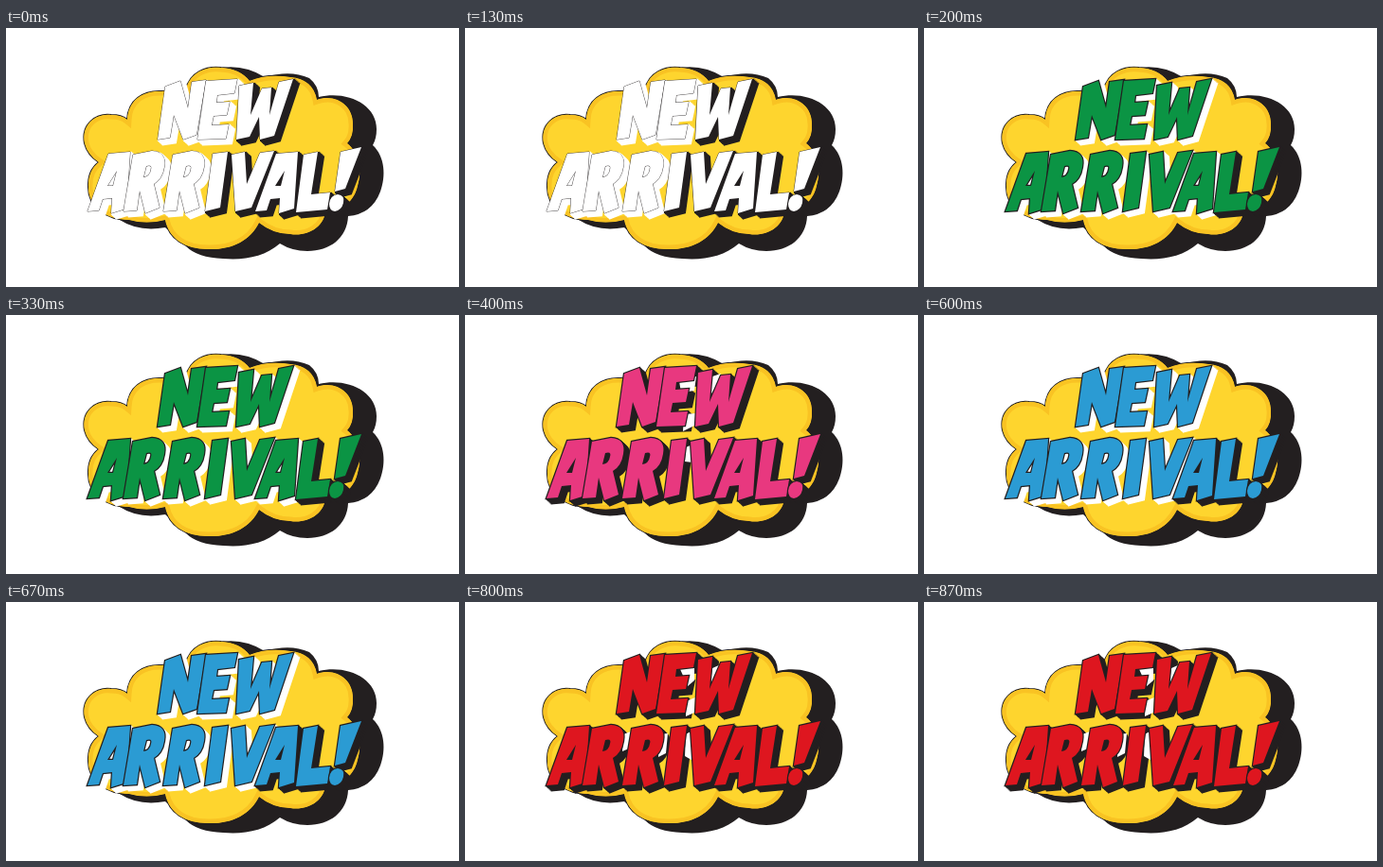
An HTML page with a canvas for the animation above (0.99 s loop, 478 by 274 pixels).

```html
<!DOCTYPE html>
<html lang="en">
<head>
<meta charset="utf-8">
<title>New arrival!</title>
<style>
html, body { margin: 0; overflow: hidden; background: #fff; }
canvas { display: block; }
</style>
</head>
<body>
<canvas id="stage" width="478" height="274" aria-label="New arrival!"></canvas>
<script>
const ctx = document.getElementById('stage').getContext('2d');
const DARK = '#231f20', LOOP = 990, STEP = 200;

const cloud = new Path2D(`M83 122C79 101 96 90 111 92Q122 92 128 97C129 76 145 66 164 67
  L190 65C194 47 211 40 227 42Q247 43 257 56Q276 48 300 52Q324 54 328 76
  C348 69 366 82 366 101Q367 114 360 122C373 132 376 151 371 167
  C367 185 353 194 337 192C337 211 317 221 300 218Q282 218 267 206
  C257 226 237 235 213 234C189 234 172 223 168 203Q148 208 130 203
  C106 203 87 189 87 169Q86 151 98 142Q86 134 83 122Z`);
const cloudShadow = new Path2D(`M222 43Q249 37 273 52Q300 44 320 53Q330 61 330 73
  C359 66 391 80 391 107Q391 117 387 124C400 136 401 157 395 173
  Q386 197 361 199C360 222 342 236 318 236Q302 236 289 228
  C273 242 251 246 229 244Q202 243 190 231L168 211Q140 216 120 203L140 150Z`);

const A = 'M108 133L131 131 127 191 111 196 112 180 102 181 98 193 86 194ZM117 151L113 167 107 167Z';
const R = `M134 134L154 130Q170 131 167 147Q165 160 156 165L162 190 147 196 141 172 138 193 124 194Z
  M148 146Q155 144 153 150Q152 157 145 158Z`;
const shifted = (d, dx) => {
  const path = new Path2D();
  path.addPath(new Path2D(d), new DOMMatrix([1, 0, 0, 1, dx, 0]));
  return path;
};
const letters = [
  ['M168 62L184 56 192 85 196 57 211 55 201 113 187 118 177 92 173 116 160 118Z'],
  ['M211 56L244 54 241 69 223 71 222 79 236 78 233 92 219 93 217 103 235 102 232 117 202 118Z'],
  ['M246 61L261 58 258 92 270 64 280 63 278 92 288 57 303 54 283 114 268 118 267 94 257 115 243 118Z'],
  [A], [R], [R, 42],
  ['M218 133L234 131 226 190 210 194Z'],
  ['M238 134L252 131 254 165 268 132 283 130 259 190 242 194Z'],
  [A, 177],
  ['M314 134L329 131 322 176 342 174 339 192 306 195Z'],
  ['M353 131L375 126 358 170 347 173ZM341 186Q342 177 350 176Q358 177 356 185Q354 193 347 194Q341 193 341 186Z']
].map(([d, dx = 0]) => shifted(d, dx));

// "w" marks a letter whose drop shadow is white; gaps are white patches behind the lettering.
const looks = [
  { face: '#fff', shadows: 'wwkwwwkkkkk', line: 0.8 },
  { face: '#0b9444', shadows: 'wwwwwwwwwkk' },
  { face: '#e8387f', shadows: 'kkkkkkkkkkk',
    gaps: 'M226 70L244 65 242 80 228 82ZM258 66L270 62 264 77 257 88ZM231 105L244 104 242 117 230 123ZM233 140L240 137 249 157 232 155Z' },
  { face: '#2b9bd3', shadows: 'wwwwwwwwkkk' },
  { face: '#de161f', shadows: 'kkkkkkkkkkk',
    gaps: 'M227 71L242 68 242 83 235 89ZM261 70L270 66 264 88 258 92ZM233 105L243 101 242 117 233 121ZM167 140L175 137 173 155 166 158ZM205 140L214 139 212 160 204 164ZM233 140L238 137 244 170 232 163Z' }
].map(look => ({ line: 2.4, ...look, gaps: new Path2D(look.gaps) }));

function drawCloud() {
  ctx.fillStyle = DARK;
  ctx.fill(cloudShadow);
  ctx.lineWidth = 2;
  ctx.strokeStyle = DARK;
  ctx.stroke(cloud);
  ctx.save();
  ctx.clip(cloud);
  ctx.fillStyle = '#fed52e';
  ctx.fill(cloud);
  ctx.lineWidth = 9;
  ctx.strokeStyle = '#f9c323';
  ctx.stroke(cloud);
  ctx.restore();
}

function drawShadow(letter, color) {
  ctx.fillStyle = ctx.strokeStyle = color;
  ctx.lineWidth = 2;
  for (let i = 6; i > 0; i--) {
    ctx.save();
    ctx.translate(i, i * 0.9);
    ctx.fill(letter, 'evenodd');
    ctx.stroke(letter);
    ctx.restore();
  }
}

function draw({ face, shadows, line, gaps }) {
  ctx.fillStyle = '#fff';
  ctx.fillRect(0, 0, 478, 274);
  drawCloud();
  letters.forEach((letter, i) => drawShadow(letter, shadows[i] === 'w' ? '#fff' : DARK));
  ctx.fillStyle = '#fff';
  ctx.fill(gaps);
  for (const letter of letters) {
    ctx.lineWidth = line;
    ctx.strokeStyle = DARK;
    ctx.stroke(letter);
    ctx.fillStyle = face;
    ctx.fill(letter, 'evenodd');
  }
}

function tick() {
  draw(looks[Math.floor(performance.now() % LOOP / STEP)]);
  requestAnimationFrame(tick);
}
tick();
</script>
</body>
</html>
```
